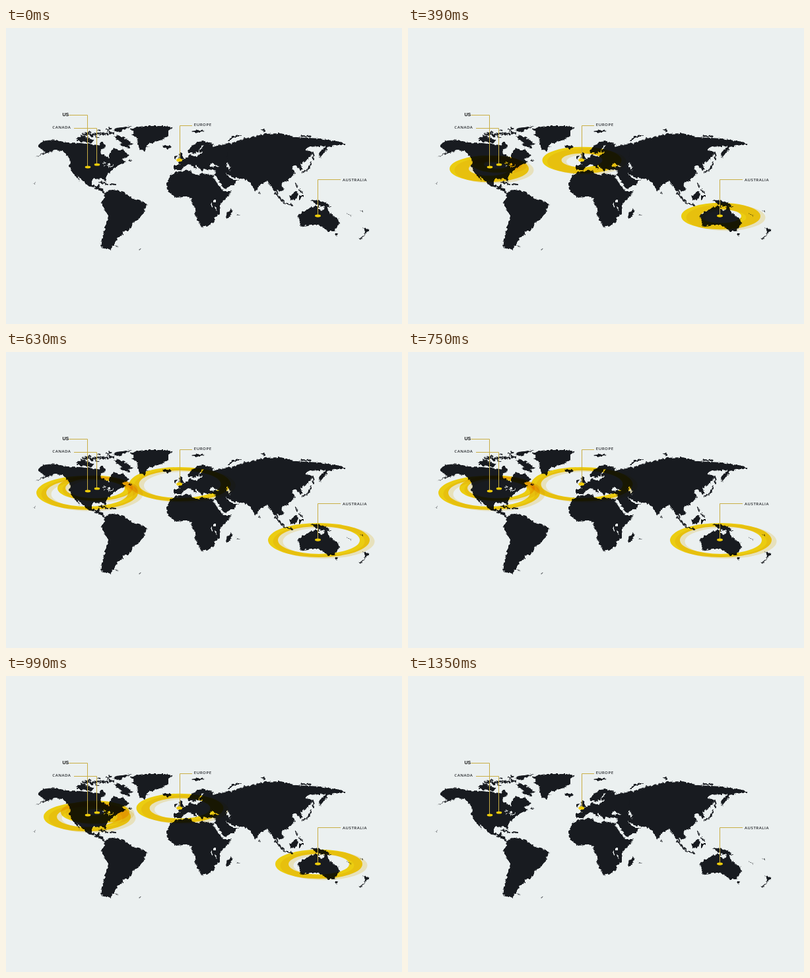
These frames come from a looping animation (600 px wide and 450 px high, 1830 ms). An HTML page:

```html
<!DOCTYPE html>
<html lang="en">
<head>
<meta charset="utf-8">
<title>World map pulses</title>
<style>
html, body { margin: 0; width: 100%; height: 100%; overflow: hidden; background: #ebf0f0; }
svg { display: block; width: 600px; height: 450px; isolation: isolate; background: #ebf0f0; }
.land { fill: #181b20; }
.isles { fill: none; stroke: #181b20; stroke-width: 2; stroke-linecap: round; stroke-linejoin: round; }
.fine { stroke-width: 1.2; }
.water { fill: #ebf0f0; }
.inlets { fill: none; stroke: #ebf0f0; stroke-width: 1.5; stroke-linecap: round; }
.ring { fill: none; stroke: #ffda12; mix-blend-mode: multiply; }
.ghost { stroke: #fbefc8; }
.leads { fill: none; stroke: #c9ae45; }
.dots { fill: #f0cd0a; }
text { font: 600 6.1px "Open Sans", sans-serif; letter-spacing: .5px; fill: #24272b; }
.bold { font: 700 7px "Liberation Sans", sans-serif; letter-spacing: 0; fill: #111; }
</style>
</head>
<body>
<svg viewBox="0 0 600 450">
  <filter id="coast" x="0" y="0" width="600" height="450" filterUnits="userSpaceOnUse" color-interpolation-filters="sRGB">
    <feTurbulence type="fractalNoise" baseFrequency=".25" numOctaves="2" seed="4"/>
    <feDisplacementMap in="SourceGraphic" scale="5" xChannelSelector="R" yChannelSelector="G"/>
  </filter>

  <g filter="url(#coast)">
    <g class="land">
      <!-- North America -->
      <path d="M49 178 55 172 70 170 92 174 113 175 140 178 145 172 152 181 143 186 144 191 156 198 158 189 163 182 172 186 177 184 187 195 175 200 182 203 170 209 157 219 151 226 152 234 147 229 130 230 130 238 136 241 143 236 141 243 147 244 148 250 156 252 150 253 140 245 126 241 117 233 108 225 112 234 103 222 96 212 97 199 86 187 75 186 44 196 59 189 53 185Z"/>
      <!-- Greenland -->
      <path d="M187 153 208 149 240 149 253 151 246 156 246 164 235 170 217 176 209 187 204 186 199 176 200 169 191 162 195 159Z"/>
      <!-- Arctic Canada -->
      <path d="M163 165 170 163 183 169 193 177 186 178 189 182 180 181 172 178 176 175ZM163 157 167 152 191 149 184 153 170 158ZM107 168 115 164 134 171 130 175 113 173ZM185 202 188 199 193 203Z"/>
      <!-- South America -->
      <path d="M150 252 154 247 162 246 179 249 188 257 192 260 208 264 214 268 206 284 199 293 193 296 185 309 178 309 178 314 171 318 166 323 165 328 158 337 147 335 143 331 148 310 155 286 144 267 149 258Z"/>
      <!-- Africa, Madagascar -->
      <path d="M251 222 262 218 280 216 282 221 293 224 296 221 316 224 314 227 322 239 329 248 342 248 338 254 324 270 324 283 316 288 317 293 307 301 296 303 286 283 287 276 280 264 281 259 270 256 255 257 244 246 243 236Z"/>
      <path d="M342 274 343 279 337 290 333 287 335 280Z"/>
      <!-- Europe -->
      <path d="M275 185 288 175 298 171 316 177 313 181 330 176 346 174 346 222 318 223 316 216 304 215 299 214 298 219 288 208 288 215 281 208 276 207 264 216 255 216 255 208 264 208 261 203 277 196 279 192 288 195 298 188 288 189 286 192 282 189 276 189Z"/>
      <path d="M262 189 267 190 269 199 260 201 263 197ZM255 195 259 194 259 198 255 199ZM237 179 248 178 251 181 244 184ZM282 157 290 155 301 156 287 160Z"/>
      <!-- Asia -->
      <path d="M344 174 358 169 392 161 415 160 440 166 475 168 500 172 518 178 500 178 488 182 476 197 474 190 485 179 475 180 456 181 453 186 462 187 464 191 456 201 446 207 449 215 446 216 440 208 433 212 438 220 428 232 417 236 421 245 418 249 411 246 413 255 401 240 396 232 383 240 378 249 370 235 362 230 343 227 335 222 340 229 352 231 345 238 330 245 316 222 320 215 338 216 335 190Z"/>
      <!-- Borneo, New Guinea -->
      <path d="M429 256 440 248 442 254 438 262 431 261ZM461 261 478 263 487 267 494 273 474 270Z"/>
      <!-- Australia, Tasmania, New Zealand -->
      <path d="M442 284 455 277 463 272 474 270 474 275 480 279 484 269 490 280 503 291 505 297 498 309 487 309 478 302 472 299 462 299 445 302 447 298Z"/>
      <path d="M497 312 503 312 500 316ZM540 303 550 307 543 315 544 309ZM534 321 545 314 538 321Z"/>
    </g>
    <path id="arctic" class="isles"/>
    <path class="isles" d="M142 234 154 238M159 237 166 238M337 171 343 166 356 163M387 154 393 156M447 164 462 165"/>
    <path class="isles" d="M465 190 466 200M462 204 459 214 449 220M439 237 441 242M444 246 449 250M407 251 421 264M420 266 434 269M445 255V262M446 256H450"/>
    <path class="isles fine" d="M518 283 523 286M538 279 540 278M43 236H43.5M166 332H169M202 336H204M350 284H354M384 249V252"/>
    <path class="water" d="M308 208 311 206 323 210 309 211ZM333 206 337 205 340 213 338 217ZM145 206 149 204 153 206ZM149 208H151L148 211ZM153 207H158L155 211ZM314 261H318V265H314Z"/>
    <path class="inlets" d="M156 211 162 209M291 191 295 183 299 178M311 267 313 273M317 272 318 277M317 224 329 245M334 222 345 229"/>
  </g>

  <g id="rings"></g>

  <path class="leads" d="M95.5 132.5H123.5V211M103 152.5H137.5V207M282 148.5H263.5V200M507 230.5H472.5V285"/>
  <g class="dots">
    <ellipse cx="124" cy="211.5" rx="4.3" ry="1.9"/>
    <ellipse cx="138" cy="207.7" rx="4.3" ry="1.9"/>
    <ellipse cx="262.7" cy="200.7" rx="4.5" ry="2.5"/>
    <ellipse cx="472.5" cy="285.6" rx="4.5" ry="2.1"/>
  </g>
  <text class="bold" x="85.5" y="134.4">US</text>
  <text x="70.3" y="153.4">CANADA</text>
  <text x="284.8" y="149.2">EUROPE</text>
  <text x="510" y="232.8">AUSTRALIA</text>
</svg>
<script>
const LOOP = 1830, TICK = 30, TILT = 0.338;

// Steps: time, outer radius, inner radius
const wide = [
  [30, 0, 0], [270, 40, 5], [390, 60, 31], [510, 74, 57], [600, 77, 62],
  [750, 77, 62], [990, 66, 46], [1110, 73, 70.4], [1350, 77, 77]
];
const small = [
  [30, 0, 0], [270, 25, 3], [510, 51, 37], [630, 57, 45],
  [750, 57, 45], [990, 52, 14], [1110, 49, 38], [1350, 57, 57]
];

const layer = document.getElementById("rings");

// Scattered islets north of Canada
let seed = 7;
const rand = () => (seed = seed * 16807 % 2147483647) / 2147483647;
let islets = "";
for (let i = 0; i < 26; i++) {
  const x = 108 + i * 2, y = 171 - i * 0.35 - rand() * 11;
  islets += `M${x} ${y}l${2 + rand() * 5} ${rand() * 2 - 0.5}`;
}
document.getElementById("arctic").setAttribute("d", islets);

function circle(x, y, name) {
  const el = document.createElementNS("http://www.w3.org/2000/svg", "circle");
  el.setAttribute("class", name);
  el.setAttribute("transform", `translate(${x} ${y}) scale(1 ${TILT})`);
  return layer.appendChild(el);
}

function pulse(x, y, steps) {
  const parts = [circle(x + 7.5, y + 2, "ring ghost"), circle(x, y, "ring")];
  return { parts, steps };
}

const pulses = [
  pulse(123, 214, wide),
  pulse(135, 207, small),
  pulse(263.5, 201, wide),
  pulse(474, 286, wide)
];

function sample(steps, t) {
  const k = steps.findIndex(s => s[0] > t);
  if (k < 1) return [0, 0];
  const a = steps[k - 1], b = steps[k];
  const p = (t - a[0]) / (b[0] - a[0]);
  return [1, 2].map(n => a[n] + (b[n] - a[n]) * p);
}

function draw(t) {
  for (const { parts, steps } of pulses) {
    const [outer, inner] = sample(steps, t);
    for (const el of parts) {
      el.setAttribute("r", (outer + inner) / 2);
      el.setAttribute("stroke-width", outer - inner);
    }
  }
}

function frame(now) {
  draw(Math.floor((now % LOOP) / TICK) * TICK);
  requestAnimationFrame(frame);
}
draw(0);
requestAnimationFrame(frame);
</script>
</body>
</html>
```
